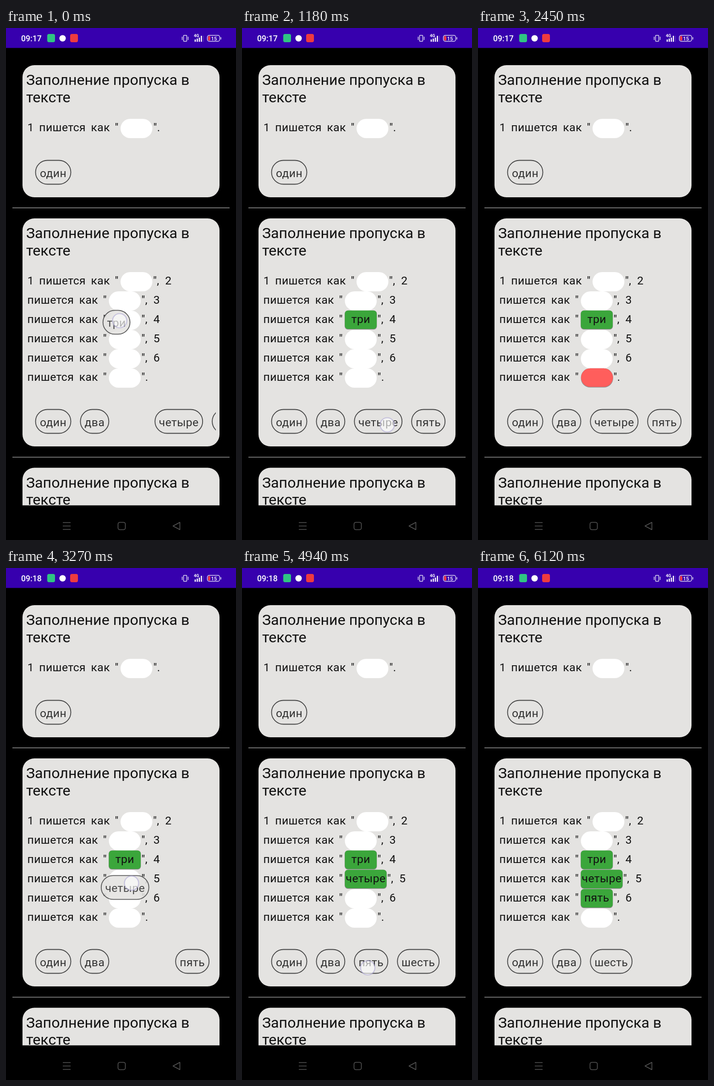
Recreate the animation shown at these times as an HTML page. Size 502 by 1116 pixels, loop 8000 ms.

```html
<!DOCTYPE html>
<html lang="ru">
<head>
<meta charset="utf-8">
<title>Заполнение пропуска</title>
<style>
  html, body { margin: 0; width: 100%; height: 100%; overflow: hidden; background: #000; }
  svg { display: block; width: 100%; height: 100%; }
  text { font-family: Roboto, sans-serif; font-size: 24.7px; letter-spacing: .4px; fill: #111; white-space: pre; }
  .title { font-size: 32.2px; letter-spacing: 0; }
  .chip rect { fill: none; stroke: #444; stroke-width: 1.8; }
  .chip text { fill: #333; }
  .chip.lifted { opacity: .88; }
  .chip.lifted rect { fill: #e4e3e1; }
  .mid { text-anchor: middle; }
  .status { font-size: 17.6px; letter-spacing: 0; font-weight: 500; fill: #fff; }
  #statusIcons text { letter-spacing: 0; fill: #fff; }
</style>
</head>
<body>
<svg viewBox="0 0 502 1116">
  <defs>
    <clipPath id="trayClip"><rect x="36" y="820" width="422" height="80"/></clipPath>
    <clipPath id="pageClip"><rect y="43" width="502" height="997.5"/></clipPath>
  </defs>
  <rect width="502" height="1116"/>
  <rect width="502" height="43.5" fill="#3700ae"/>
  <g id="statusIcons">
    <rect x="90" y="13" width="17" height="18" rx="4" fill="#2fc483"/>
    <circle cx="123.500" cy="22.500" r="7" fill="#fff"/>
    <rect x="140" y="13" width="17" height="18" rx="4" fill="#ee3a3f"/>
    <g fill="none" stroke="#ddd8f2" stroke-width="1.500">
      <rect x="387.500" y="16" width="7" height="13" rx="1"/>
      <path d="M384.500 19v7M397.500 19v7"/>
      <rect x="439.500" y="16" width="27" height="13" rx="4"/>
      <path d="M469 20v5"/>
    </g>
    <text x="410" y="20" style="font-size:9px;font-weight:700">4G</text>
    <path d="M413 30v-5M417.500 30v-7M422 30v-9M426.500 30v-13" stroke="#fff" stroke-width="2.500"/>
    <path d="M431 17v13" stroke="#5a38bd" stroke-width="1.500"/>
    <rect x="441" y="17.500" width="5" height="10" rx="2" fill="#f0384a"/>
    <text x="454" y="26.500" class="mid" style="font-size:11.500px;font-weight:500">15</text>
  </g>
  <g id="page" clip-path="url(#pageClip)"></g>
  <g fill="none" stroke="#555" stroke-width="1.600">
    <path d="M124 1078h17M124 1085.500h17M124 1093h17"/>
    <rect x="244.500" y="1077.500" width="16" height="16" rx="4"/>
    <path d="M379.500 1077.500v16l-15-8z" stroke-linejoin="round"/>
  </g>
  <g id="scene"></g>
</svg>
<script>
const LOOP = 8000, CLOCK_TICK = 2600;
const TRAY_X = 64, TRAY_Y = 831, CHIP_H = 53, CHIP_GAP = 19.9;
const FINGER_LAG = 50;            // the lifted chip trails the finger
const MOVE_DELAY = 120, MOVE_TIME = 250;
const WRONG_SLOT = 5, WRONG_UNTIL = 2600;

const chips = [['один', 78], ['два', 63], ['три', 60], ['четыре', 105], ['пять', 74], ['шесть', 92]]
  .map(([word, width]) => ({ word, width }));

// path: [time, x, y] of the finger; the chip leaves the tray at lift
const drags = [
  { chip: 2, lift: -500, drop: 390, correct: true,
    path: [[-50, 241, 641.5], [0, 248, 638], [150, 258, 636], [390, 260, 636]] },
  { chip: 3, lift: 1480, drop: 1940, correct: false,
    path: [[1180, 317, 865], [1480, 317, 865], [1750, 262, 775], [1940, 260, 765]] },
  { chip: 3, lift: 2830, drop: 3600, correct: true,
    path: [[2560, 297, 863], [2830, 297, 863], [3100, 248, 740], [3220, 259.5, 696.5],
           [3270, 274, 687], [3400, 274, 676], [3600, 268, 676]] },
  { chip: 4, lift: 5000, drop: 5750, correct: true,
    path: [[4700, 274.5, 871.5], [5000, 274.5, 871.5], [5250, 284, 735], [5340, 281, 717.5],
           [5390, 271, 720], [5560, 262, 720], [5750, 262, 720]] },
];
for (const d of drags) if (d.correct) chips[d.chip].placedAt = d.drop;

const clamp = v => Math.max(0, Math.min(1, v));
const ease = v => (1 - Math.cos(Math.PI * clamp(v))) / 2;

function along(path, t) {
  const next = path.findIndex(key => key[0] > t);
  if (next === 0) return path[0].slice(1);
  if (next < 0) return path[path.length - 1].slice(1);
  const [t0, x0, y0] = path[next - 1], [t1, x1, y1] = path[next];
  const k = (t - t0) / (t1 - t0);
  return [x0 + (x1 - x0) * k, y0 + (y1 - y0) * k];
}

const text = (x, y, s, cls = '') => `<text x="${x}" y="${y}" class="${cls}">${s}</text>`;
const rect = (x, y, w, h, r, fill) =>
  `<rect x="${x}" y="${y}" width="${w}" height="${h}" rx="${r}" fill="${fill}"/>`;
const raised = (x, y, w, h, r, fill) =>
  rect(x - .4, y, w + .8, h + 1.2, r, '#8b8b8b') + rect(x, y, w, h, r, fill);
const blank = (x, y) => rect(x, y, 69.5, 42, 21, '#fff');

const chip = ({ word, width }, x, y, cls = '') =>
  `<g class="chip ${cls}">${rect(x + .5, y + .5, width - 1, CHIP_H - 1, 26, 'none')}
   ${text(x + width / 2, y + 36.5, word, 'mid')}</g>`;

const card = (y, h) => rect(36, y, 430, h, 26, '#e4e3e1') +
  text(44, y + 43, 'Заполнение пропуска в', 'title') + text(44, y + 80.5, 'тексте', 'title');

const divider = y => rect(14, y, 474, 1.6, 0, '#8c8c8c');

// words before a gap; the first line is pushed right by the leading number
function lineStart(y, first) {
  const x = first ? 72.3 : 46.5;
  return (first ? text(46.8, y, '1') : '') +
    text(x, y, 'пишется') + text(x + 113.3, y, 'как') + text(x + 165.3, y, '"');
}

document.getElementById('page').innerHTML =
  card(81, 288) + lineStart(225, true) + blank(250, 198) + text(321.5, 225, '".') +
  chip(chips[0], TRAY_X, 288) + divider(391.2) +
  card(415, 497) + divider(934.7) + card(958.5, 300);

function slotLine(i, t) {
  const base = 559 + 42 * i, top = base - 27, x = i ? 224.5 : 250;
  const filled = chips[i].placedAt <= t;
  const width = filled && i === 3 ? 91 : 69.5;
  const wrong = i === WRONG_SLOT && t >= drags[1].drop && t < WRONG_UNTIL;
  let gap = blank(x, top);
  if (filled) {
    gap = raised(x, top - .2, width, 40.3, 7, '#3ba63b') +
      text(x + width / 2, base, chips[i].word, 'mid');
  } else if (wrong) {
    gap = raised(x + .5, top - .2, 69.5, 40.5, 20, '#ff5e5c');
  }
  const end = x + width + 1.5;
  return lineStart(base, i === 0) + gap + text(end, base, i < 5 ? '",' : '".') +
    (i < 5 ? text(end + 26.2, base, i + 2) : '');
}

function tray(t) {
  let x = TRAY_X, out = '';
  chips.forEach((c, i) => {
    const lifted = drags.some(d => d.chip === i && t >= d.lift && t < d.drop);
    const placed = c.placedAt <= t;
    if (!lifted && !placed) out += chip(c, x, TRAY_Y);
    const closed = placed ? ease((t - c.placedAt - MOVE_DELAY) / MOVE_TIME) : 0;
    x += (c.width + CHIP_GAP) * (1 - closed);
  });
  return `<g clip-path="url(#trayClip)">${out}</g>`;
}

function touch(t) {
  const drag = drags.find(d => t >= d.path[0][0] && t < d.drop);
  if (!drag) return '';
  const [x, y] = along(drag.path, t);
  let out = '';
  if (t >= drag.lift) {
    const c = chips[drag.chip], [cx, cy] = along(drag.path, t - FINGER_LAG);
    out = chip(c, cx - c.width / 2, cy - CHIP_H / 2, 'lifted');
  }
  return out + `<circle cx="${x}" cy="${y}" r="15.5" fill="#fff" fill-opacity=".6"
    stroke="#a79fd2" stroke-opacity=".55" stroke-width="2.2"/>`;
}

const scene = document.getElementById('scene');
function draw(t) {
  scene.innerHTML = text(33, 29, t < CLOCK_TICK ? '09:17' : '09:18', 'status') +
    chips.map((_, i) => slotLine(i, t)).join('') + tray(t) + touch(t);
}

const start = performance.now();
function frame() {
  draw((performance.now() - start) % LOOP);
  requestAnimationFrame(frame);
}
frame();
</script>
</body>
</html>
```
